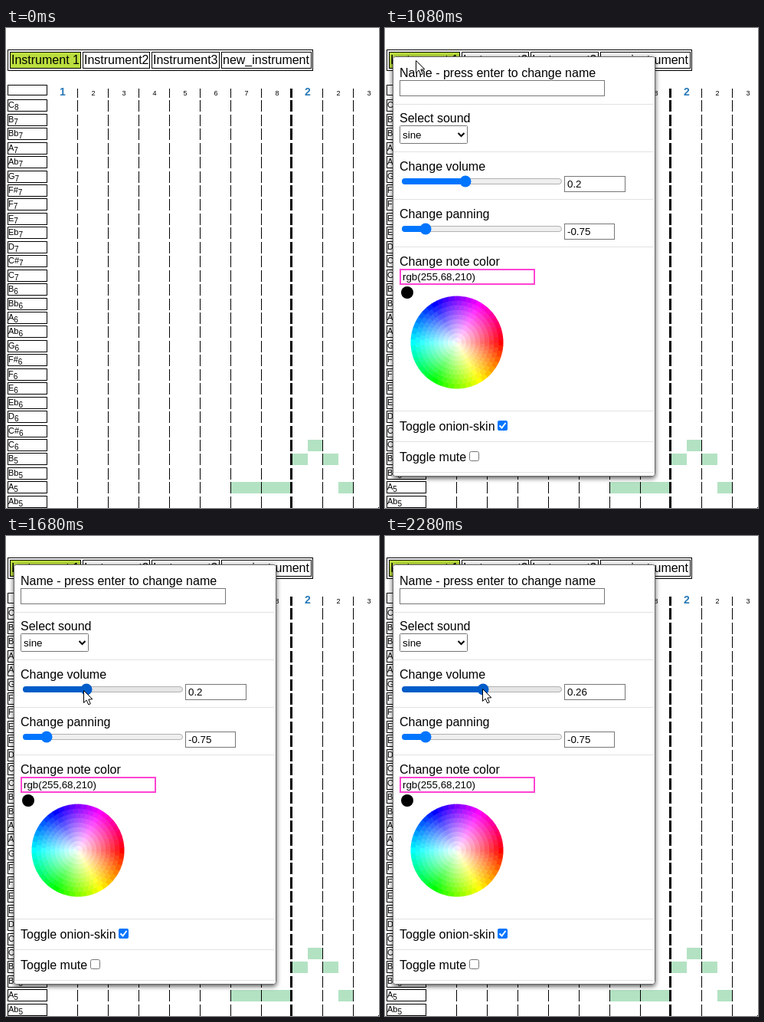
Write an HTML page with a canvas that moves like this. It is 487 by 626 pixels and loops after 2400 ms.

```html
<!DOCTYPE html>
<html lang="en">
<head>
<meta charset="utf-8">
<title>Instrument settings</title>
<style>
html, body { margin: 0; width: 100%; height: 100%; overflow: hidden; background: #fff; }
canvas { display: block; }
</style>
</head>
<body>
<canvas id="stage" width="487" height="626"></canvas>
<script>
const ctx = document.getElementById('stage').getContext('2d');
const LOOP = 2400, TICK = 120;
const NOTES = ['C', 'B', 'Bb', 'A', 'Ab', 'G', 'F#', 'F', 'E', 'Eb', 'D', 'C#'];
const PINK = 'rgb(255,68,210)';

// Pointer position for every tick, starting at the second one
const POINTER = [
  [442, 587], [312, 392], [150, 172], [33, 39], [42, 42], [42, 42], [42, 42],
  [40, 42], [92, 118], [127, 191], [114, 198], [103, 201], [101, 201],
  [118, 203], [147, 203], [143, 202], [128, 200], [127, 199]
];

function fill(x, y, w, h, color) {
  ctx.fillStyle = color;
  ctx.fillRect(x, y, w, h);
}

function box(x, y, w, h, color = '#000', line = 1) {
  ctx.strokeStyle = color;
  ctx.lineWidth = line;
  ctx.strokeRect(x + line / 2, y + line / 2, w - line, h - line);
}

function text(str, x, y, size = 16, color = '#000', align = 'left', weight = 'normal') {
  ctx.font = `${weight} ${size}px "Liberation Sans", Arial, sans-serif`;
  ctx.textAlign = align;
  ctx.fillStyle = color;
  ctx.fillText(str, x, y);
  return ctx.measureText(str).width;
}

function rounded(x, y, w, h, r, color, border) {
  ctx.beginPath();
  ctx.roundRect(x, y, w, h, r);
  ctx.fillStyle = color;
  ctx.fill();
  if (border) {
    ctx.strokeStyle = border;
    ctx.lineWidth = 1;
    ctx.stroke();
  }
}

function disc(x, y, r, color) {
  ctx.beginPath();
  ctx.arc(x, y, r, 0, 7);
  ctx.fillStyle = color;
  ctx.fill();
}

function polyline(points, color, width) {
  ctx.beginPath();
  points.forEach(p => ctx.lineTo(...p));
  ctx.strokeStyle = color;
  ctx.lineWidth = width;
  ctx.stroke();
}

function drawTabs() {
  box(2, 28, 399, 28);
  fill(5, 31, 93, 22, '#bbde3e');
  [['Instrument 1', 5, 93], ['Instrument2', 100, 88], ['Instrument3', 190, 89], ['new_instrument', 281, 118]]
    .forEach(([name, x, w]) => {
      box(x, 31, w, 22);
      text(name, x + 2, 47);
    });
}

function drawBars(y, h) {
  for (let i = 0; i < 10; i++) {
    const thick = i === 7;
    fill(93 + 40 * i - (thick ? 2 : 0), y, thick ? 3 : 1, h, '#000');
  }
}

const rowTop = i => Math.round(93.4 + 18.44 * i);

function drawGrid() {
  box(2, 74, 52, 14);
  drawBars(79, 12);
  for (let i = 0; i < 11; i++) {
    const beat = i % 8 + 1, x = 74 + 40 * i;
    if (beat === 1) text(i ? '2' : '1', x, 88, 14, '#2a7ab8', 'center', 'bold');
    else text(beat, x, 88, 9, '#000', 'center');
  }
  [[24, 394, 20], [25, 374, 20], [25, 414, 20], [27, 293, 40], [27, 333, 40], [27, 434, 20]]
    .forEach(([row, x, w]) => fill(x, rowTop(row) + 1, w, 15, '#b3e2c3'));
  for (let i = 0; i < 29; i++) {
    const y = rowTop(i);
    box(2, y, 52, 16);
    const w = text(NOTES[i % 12], 3, y + 11, 11);
    text(8 - Math.ceil(i / 12), 3 + w, y + 14, 10);
    drawBars(y + 1, 15);
  }
  fill(486, 625, 1, 1, '#000');
}

function field(x, y, w, h, value) {
  fill(x, y, w, h, '#fff');
  box(x, y, w, h, '#767676');
  text(value, x + 4, y + 15, 13.33);
}

function slider(y, thumb, state) {
  const color = { idle: '#0075ff', hover: '#005cc8', active: '#3793ff' }[state];
  const track = { idle: '#efefef', hover: '#e5e5e5', active: '#f5f5f5' }[state];
  rounded(22.5, y - 3.5, 208, 7, 3.5, track, '#b2b2b2');
  rounded(22, y - 4, thumb - 22, 8, 4, color);
  disc(thumb, y, 7.5, color);
}

function drawWheel(x, y, radius) {
  const rings = 10, sectors = 48, step = Math.PI * 2 / sectors;
  for (let ring = rings; ring > 0; ring--) {
    for (let s = 0; s < sectors; s++) {
      const mid = (s + ring % 2 / 2) * step;
      ctx.beginPath();
      ctx.moveTo(x, y);
      ctx.arc(x, y, radius * ring / rings, mid - step * 0.5, mid + step * 0.6);
      const light = 100 - 50 * (ring - 0.5) / (rings - 0.5);
      ctx.fillStyle = `hsl(${mid * 180 / Math.PI}, 100%, ${light}%)`;
      ctx.fill();
    }
  }
}

function drawPanel(thumb, state, volume) {
  ctx.save();
  ctx.shadowColor = 'rgba(0,0,0,.7)';
  ctx.shadowBlur = 6;
  ctx.shadowOffsetY = 2;
  rounded(10, 37, 343, 548, 4, '#fff');
  ctx.restore();
  rounded(10.5, 37.5, 342, 547, 3, '#fff', '#666');
  [99, 161, 223, 285, 499, 539, 579].forEach(y => fill(11, y, 339, 1, '#e2e2e2'));
  [['Name - press enter to change name', 64], ['Select sound', 123], ['Change volume', 186],
   ['Change panning', 248], ['Change note color', 310], ['Toggle onion-skin', 525], ['Toggle mute', 565]]
    .forEach(([label, y]) => text(label, 19, y));

  field(19, 68, 268, 21, '');
  rounded(19.5, 127.5, 88, 23, 1, '#fff', '#767676');
  text('sine', 23, 144, 13.33);
  polyline([[95.5, 137], [99.5, 141], [103.5, 137]], '#000', 2);

  slider(200, thumb, state);
  field(234, 193, 80, 21, volume);
  slider(262, 53, 'idle');
  field(234, 255, 66, 21, '-0.75');

  box(19, 314, 177, 21, PINK, 2);
  text(PINK, 23, 329, 13.33);
  disc(29, 345, 8, '#000');
  drawWheel(94, 410, 60.5);

  rounded(147, 512, 13, 13, 2, '#0075ff');
  polyline([[149.5, 518.5], [152.5, 521.5], [157.5, 515]], '#fff', 2);
  rounded(110.5, 552.5, 12, 12, 2, '#fff', '#767676');
}

function drawArrow(x, y) {
  ctx.save();
  ctx.translate(x + 0.5, y + 0.5);
  ctx.beginPath();
  [[0, 0], [0, 16], [3.7, 12.6], [6.2, 18.4], [8.8, 17.3], [6.3, 11.6], [11.3, 11.3]]
    .forEach(p => ctx.lineTo(...p));
  ctx.closePath();
  ctx.fillStyle = '#fff';
  ctx.fill();
  ctx.strokeStyle = '#000';
  ctx.lineWidth = 1;
  ctx.stroke();
  ctx.restore();
}

function drawTextCursor(x, y) {
  const color = '#33284f';
  fill(x, y - 7, 1, 15, color);
  [-8, 8].forEach(dy => {
    fill(x - 3, y + dy, 3, 1, color);
    fill(x + 1, y + dy, 3, 1, color);
  });
}

function draw(tick) {
  fill(0, 0, 487, 626, '#fff');
  drawTabs();
  drawGrid();
  if (tick >= 9) {
    const dragging = tick >= 15 && tick <= 18;
    const thumb = { 15: 117, 16: 144, 17: 141, 18: 128, 19: 128 }[tick] || 105;
    const state = dragging ? 'active' : tick >= 11 ? 'hover' : 'idle';
    drawPanel(thumb, state, tick === 19 ? '0.26' : '0.2');
  }
  const pointer = POINTER[tick - 2];
  if (pointer) (tick >= 5 && tick <= 8 ? drawTextCursor : drawArrow)(...pointer);
}

function frame() {
  draw(Math.floor(performance.now() % LOOP / TICK));
  requestAnimationFrame(frame);
}
frame();
</script>
</body>
</html>
```
